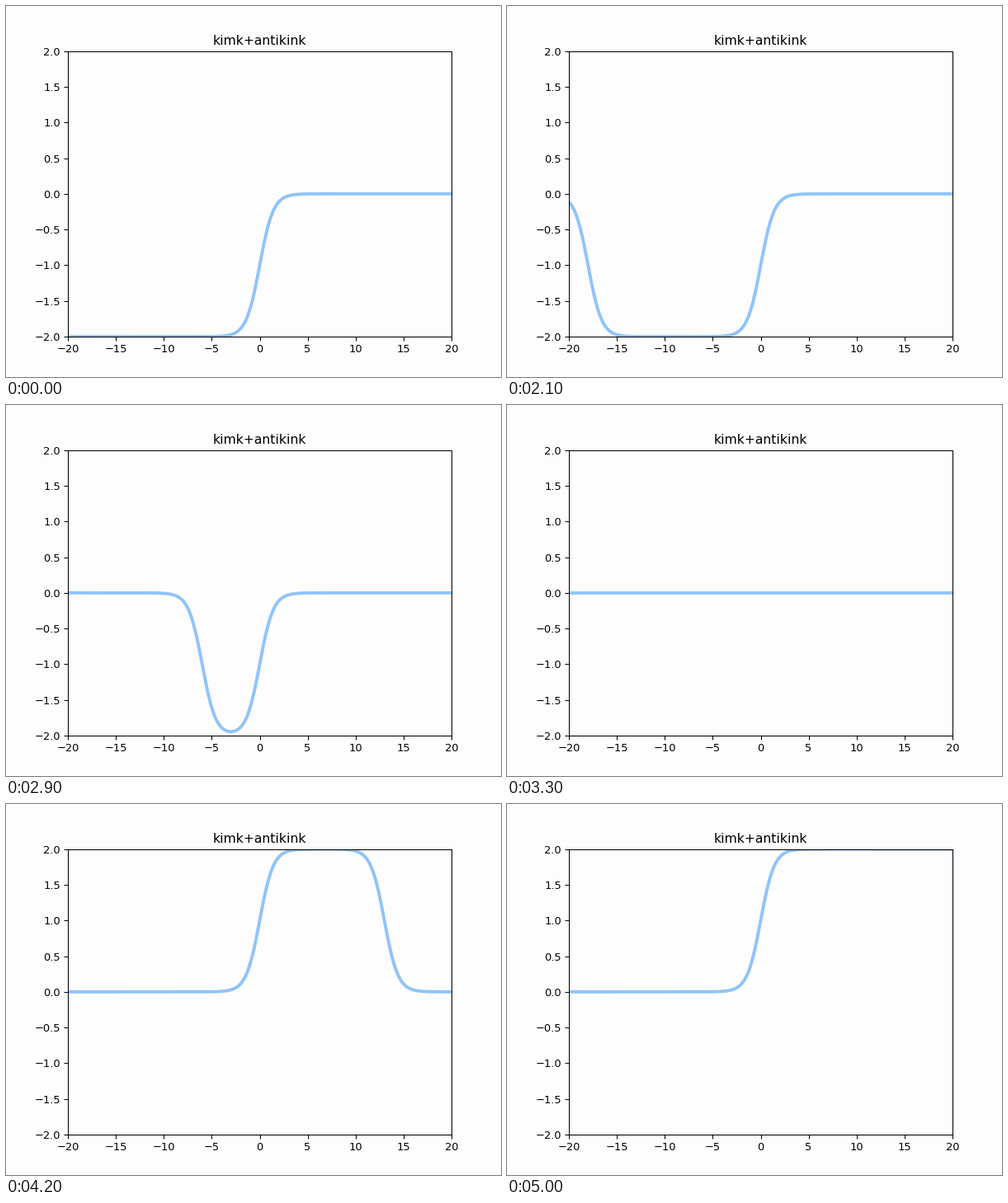
Write a matplotlib script that moves like this. It is 600 px wide and 450 px high and loops after 6.7 s.

```python
import numpy as np
import matplotlib.pyplot as plt
from matplotlib.animation import FuncAnimation

FRAMES, INTERVAL = 67, 100
SPEED = 15       # whole units per second travelled by the antikink
START = -50
PAPER = "#fefdfe"

x = np.linspace(-20, 20, 400)


def kink(u):
    return np.tanh(u / np.sqrt(2))


def center(i):
    return START + int(np.ceil(i * INTERVAL * SPEED / 1000))


fig, ax = plt.subplots(figsize=(6.4, 4.8), dpi=93.75, facecolor=PAPER)
fig.subplots_adjust(bottom=0.1087, top=0.8787)
ax.set(xlim=(-20, 20), ylim=(-2, 2), title="kimk+antikink", facecolor=PAPER)
line, = ax.plot([], [], color="#8fc4f9", lw=3)


def update(i):
    line.set_data(x, kink(x) - kink(x - center(i)))
    return line,


anim = FuncAnimation(fig, update, frames=FRAMES, interval=INTERVAL,
                     repeat=True, repeat_delay=0)
plt.show()
```
